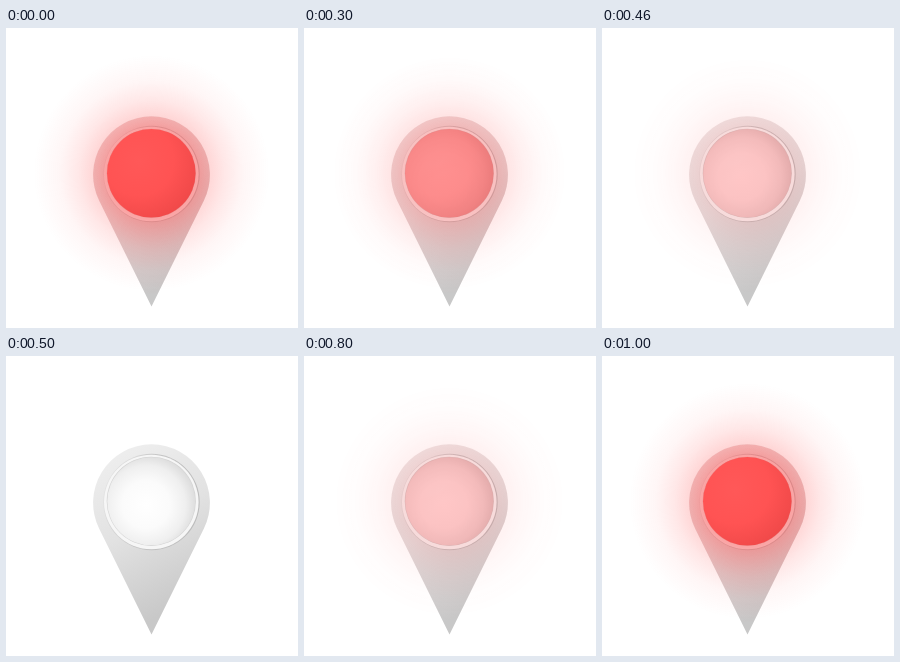
These frames come from a looping animation (292x300 px, 1100 ms). An HTML page:

```html
<!DOCTYPE html>
<html lang="en">
<head>
<meta charset="utf-8">
<title>Blinking map pin</title>
<style>
  html, body { margin: 0; width: 100%; height: 100%; overflow: hidden; background: #fff; }
  svg { display: block; width: 292px; height: 300px; }
  .lit { animation: blink 1100ms step-end infinite; }
  @keyframes blink {
    0% { opacity: 1; }
    27.2727% { opacity: .66; }
    36.3636% { opacity: .33; }
    45.4545% { opacity: 0; }
    72.7273% { opacity: .33; }
    81.8182% { opacity: .66; }
    90.9091%, 100% { opacity: 1; }
  }
</style>
</head>
<body>
<svg viewBox="0 0 292 300">
  <defs>
    <path id="pin" d="M145.5 278.5 L93.2 172.7 A58.4 58.4 0 1 1 197.8 172.7 Z"/>
    <linearGradient id="body" gradientUnits="userSpaceOnUse" x1="98" y1="108" x2="172" y2="250">
      <stop offset="0" stop-color="#ededed"/>
      <stop offset=".45" stop-color="#e2e2e2"/>
      <stop offset="1" stop-color="#c8c8c8"/>
    </linearGradient>
    <linearGradient id="rim" x1="0" y1=".2" x2="1" y2=".5">
      <stop offset="0" stop-color="#e6e6e6"/>
      <stop offset=".5" stop-color="#c4c4c4"/>
      <stop offset="1" stop-color="#bcbcbc"/>
    </linearGradient>
    <radialGradient id="lens" cx=".44" cy=".54" r=".6">
      <stop offset="0" stop-color="#fff"/>
      <stop offset=".45" stop-color="#fbfbfb"/>
      <stop offset=".75" stop-color="#efefef"/>
      <stop offset="1" stop-color="#d8d8d8"/>
    </radialGradient>
    <radialGradient id="red" cx=".36" cy=".36" r=".72">
      <stop offset="0" stop-color="#ff5858"/>
      <stop offset=".55" stop-color="#ff5353"/>
      <stop offset="1" stop-color="#ef4848"/>
    </radialGradient>
    <radialGradient id="haze" gradientUnits="userSpaceOnUse" cx="145.5" cy="145" r="118">
      <stop offset=".48" stop-color="#ff4a4a" stop-opacity=".23"/>
      <stop offset=".62" stop-color="#ff4a4a" stop-opacity=".13"/>
      <stop offset=".78" stop-color="#ff4a4a" stop-opacity=".05"/>
      <stop offset="1" stop-color="#ff4a4a" stop-opacity="0"/>
    </radialGradient>
    <radialGradient id="tint" gradientUnits="userSpaceOnUse" cx="145.5" cy="145" r="122">
      <stop offset=".37" stop-color="#ff4a4a" stop-opacity=".48"/>
      <stop offset=".48" stop-color="#ff4a4a" stop-opacity=".36"/>
      <stop offset=".62" stop-color="#ff4a4a" stop-opacity=".21"/>
      <stop offset=".8" stop-color="#ff4a4a" stop-opacity=".07"/>
      <stop offset="1" stop-color="#ff4a4a" stop-opacity="0"/>
    </radialGradient>
  </defs>

  <circle class="lit" cx="145.5" cy="145" r="118" fill="url(#haze)"/>

  <use href="#pin" fill="url(#body)"/>
  <circle cx="145.5" cy="146" r="48.2" fill="url(#rim)"/>
  <circle cx="145.3" cy="146" r="47.3" fill="#f6f6f6"/>
  <circle cx="145.3" cy="145.3" r="44.6" fill="#d4d4d4"/>
  <circle cx="145.3" cy="145.3" r="44" fill="url(#lens)"/>

  <g class="lit">
    <use href="#pin" fill="url(#tint)"/>
    <circle cx="145.3" cy="145.3" r="44.3" fill="url(#red)"/>
  </g>
</svg>
</body>
</html>
```
